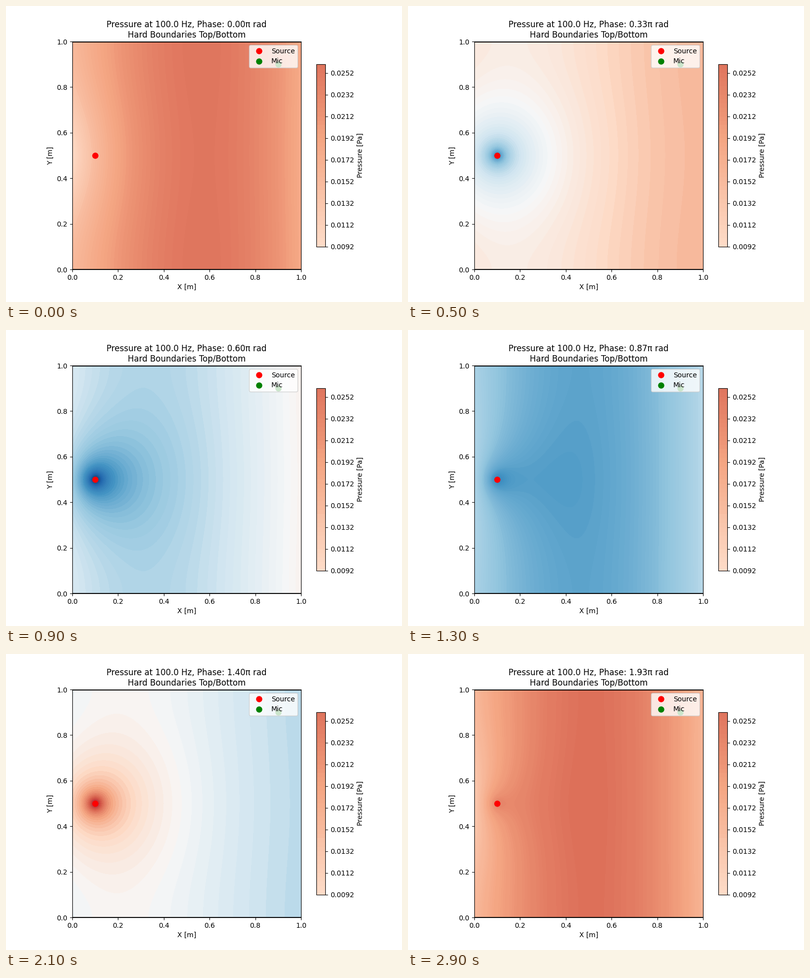
Recreate the animation shown at these times as a matplotlib script. Size 800 px wide and 600 px high, loop 3000 ms.

```python
import numpy as np
import matplotlib.pyplot as plt
from matplotlib.animation import FuncAnimation

FREQ, SPEED = 100.0, 343.0
K = 2 * np.pi * FREQ / SPEED
SPEAKER, MIC = (0.1, 0.5), (0.9, 0.9)
SOFT = 0.0124        # effective radius of the speaker
PEAK = 0.02588       # largest pressure at phase zero
MODES, GRID, FRAMES = 60, 101, 30


def mode_shapes(y):
    """Orthonormal duct modes that are even about the middle."""
    m = np.arange(MODES)[:, None]
    norm = np.where(m == 0, 1.0, np.sqrt(2))
    return norm * np.cos(2 * np.pi * m * (y - 0.5))


def solve_field(x, y):
    """Complex pressure: hard top and bottom, radiating left and right."""
    kappa = np.sqrt((2 * np.pi * np.arange(MODES)) ** 2 - K**2 + 0j)
    strength = mode_shapes(np.array([SPEAKER[1]]))[:, 0] / (2 * kappa)

    def direct(px):
        s = np.hypot(px - SPEAKER[0], SOFT)
        value = strength * np.exp(-kappa * s)
        return value, -kappa * value * (px - SPEAKER[0]) / s

    n = 600
    q = (np.arange(n) + 0.5) / n
    shapes = mode_shapes(q)

    def radiation(px):
        r = np.hypot(px - SPEAKER[0], q - SPEAKER[1])
        return (shapes * (1j * K + 1 / r)) @ shapes.T / n

    left, right = radiation(0.0), radiation(1.0)
    diag, decay = np.diag(kappa), np.diag(np.exp(-kappa))
    system = np.block([[-diag - left, (diag - left) @ decay],
                       [(right - diag) @ decay, diag + right]])
    v0, d0 = direct(0.0)
    v1, d1 = direct(1.0)
    waves = np.linalg.solve(
        system, np.concatenate([left @ v0 - d0, -right @ v1 - d1]))
    a, b = waves[:MODES], waves[MODES:]

    columns = [direct(px)[0] + a * np.exp(-kappa * px)
               + b * np.exp(-kappa * (1 - px)) for px in x]
    field = 1j * mode_shapes(y).T @ np.array(columns).T
    return field * PEAK / field.real.max()


axis = np.linspace(0, 1, GRID)
pressure = solve_field(axis, axis)
limit = np.abs(pressure).max()

fig, ax = plt.subplots(figsize=(8, 6), dpi=100)
ax.set_aspect("equal")


def fill(phase):
    return ax.contourf(axis, axis, (pressure * np.exp(1j * phase)).real,
                       levels=50, cmap="RdBu_r", vmin=-limit, vmax=limit)


layers = [fill(0.0)]
fig.colorbar(layers[0], ax=ax, shrink=0.8, label="Pressure [Pa]")
ax.plot(*SPEAKER, "ro", markersize=8, label="Source")
ax.plot(*MIC, "go", markersize=8, label="Mic")
for wall in (0, 1):
    ax.axhline(wall, color="k", lw=2)
ax.set(xlim=(0, 1), ylim=(0, 1), xlabel="X [m]", ylabel="Y [m]")
ax.legend(loc="upper right")


def update(i):
    turn = 2 * i / FRAMES
    layers.pop().remove()
    layers.append(fill(turn * np.pi))
    ax.set_title(f"Pressure at {FREQ:.1f} Hz, Phase: {turn:.2f}π rad\n"
                 "Hard Boundaries Top/Bottom")
    return layers


anim = FuncAnimation(fig, update, frames=FRAMES, interval=100,
                     repeat=True, repeat_delay=0)
plt.show()
```
